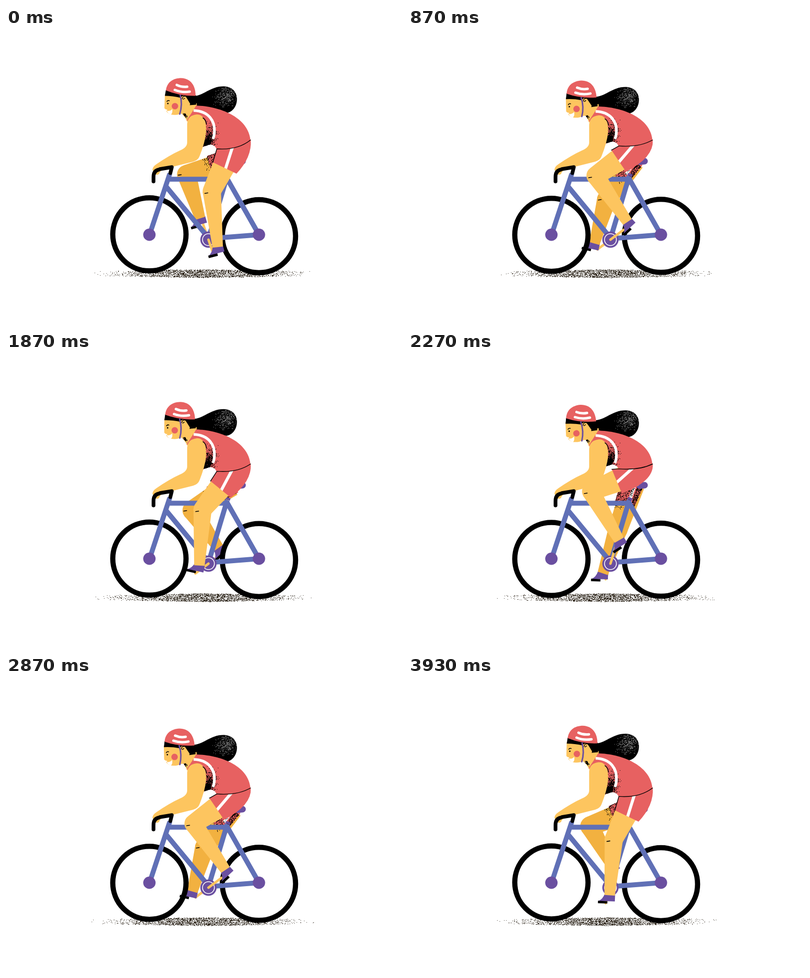
These frames come from a looping animation (800x600 px, 3.99 s). An HTML page with a canvas:

```html
<!DOCTYPE html>
<html lang="en">
<head>
<meta charset="utf-8">
<title>Cyclist</title>
<style>
html, body { margin: 0; width: 100%; height: 100%; overflow: hidden; background: #fff; }
canvas { display: block; }
</style>
</head>
<body>
<canvas id="stage" width="800" height="600"></canvas>
<script>
const ctx = document.getElementById('stage').getContext('2d');
const SKIN = '#fdc55f', FAR_SKIN = '#f2b140', RED = '#e76161', PURPLE = '#6a4fa0',
      BLUE = '#6070b6', BLACK = '#000', WHITE = '#fff';
const LOOP = 3990, STEPS_PER_MS = 0.015, STEPS_PER_TURN = 10;
const HUB = [409, 429], CRANK = 33, RAD = Math.PI / 180;

const NEAR = { hip: [456, 247], thigh: 93, shin: 114, foot: [8, -16], skin: SKIN,
               hipR: 26, kneeR: 18.5, mark: [-11, 4] };
const FAR = { hip: [455, 270], thigh: 94, shin: 93, foot: [-6, -12], skin: FAR_SKIN,
              hipR: 23, kneeR: 19.5, mark: [-14, 1] };

function random(seed) {
  let s = seed * 7919 + 17;
  return () => {
    s = (s + 0x6D2B79F5) | 0;
    let x = Math.imul(s ^ (s >>> 15), s | 1);
    x ^= x + Math.imul(x ^ (x >>> 7), x | 61);
    return ((x ^ (x >>> 14)) >>> 0) / 4294967296;
  };
}

function fill(path, color) {
  ctx.fillStyle = color;
  ctx.fill(new Path2D(path));
}

function line(path, color, width, cap = 'round') {
  ctx.strokeStyle = color;
  ctx.lineWidth = width;
  ctx.lineCap = cap;
  ctx.lineJoin = 'round';
  ctx.stroke(new Path2D(path));
}

function disc(x, y, r, color) {
  ctx.fillStyle = color;
  ctx.beginPath();
  ctx.arc(x, y, r, 0, 7);
  ctx.fill();
}

function ring(x, y, r, color, width) {
  ctx.strokeStyle = color;
  ctx.lineWidth = width;
  ctx.beginPath();
  ctx.arc(x, y, r, 0, 7);
  ctx.stroke();
}

function poly(points, color) {
  fill('M' + points.map(p => p.join(' ')).join('L') + 'Z', color);
}

// Grain: place(rand) gives one point, drawn only inside the clip path.
function grain(seed, count, color, place, clip) {
  const rand = random(seed);
  ctx.save();
  if (clip) ctx.clip(new Path2D(clip));
  ctx.fillStyle = color;
  for (let i = 0; i < count; i++) {
    const [x, y] = place(rand);
    ctx.fillRect(Math.round(x), Math.round(y), 1, 1);
  }
  ctx.restore();
}

const bell = rand => (rand() + rand() + rand() - 1.5) / 1.5;
const at = (p, d, n, along, side) =>
  [p[0] + d[0] * along + n[0] * side, p[1] + d[1] * along + n[1] * side];

function axes(a, b) {
  const dx = b[0] - a[0], dy = b[1] - a[1], len = Math.hypot(dx, dy);
  return { len, d: [dx / len, dy / len], n: [-dy / len, dx / len] };
}

function limb(a, b, ra, rb, color) {
  const { d, n } = axes(a, b);
  poly([at(a, d, n, 0, ra), at(b, d, n, 0, rb), at(b, d, n, 0, -rb), at(a, d, n, 0, -ra)], color);
}

// Two-bone leg standing on the pedal; angle 0 is straight down.
function pose(leg, angle) {
  const pedal = [HUB[0] + CRANK * Math.sin(angle), HUB[1] + CRANK * Math.cos(angle)];
  const ankle = [pedal[0] + leg.foot[0], pedal[1] + leg.foot[1]];
  const { len, d, n } = axes(leg.hip, ankle);
  const along = (leg.thigh ** 2 - leg.shin ** 2 + len ** 2) / (2 * len);
  const knee = at(leg.hip, d, n, along, Math.sqrt(Math.max(0, leg.thigh ** 2 - along ** 2)));
  return { pedal, ankle, knee, tilt: (15 + 29 * Math.sin(angle - 20 * RAD)) * RAD };
}

function drawCrank({ pedal }) {
  line(`M${HUB}L${pedal}`, SKIN, 5);
}

function drawLeg(leg, { ankle, knee, tilt }) {
  ctx.save();
  ctx.translate(...ankle);
  ctx.rotate(-tilt);
  fill('M-10-3L11-2L11 12L-2 12L-23 13Q-13 8-10-3Z', PURPLE);
  line('M-23 14.5H-4', BLACK, 5, 'butt');
  ctx.restore();
  limb(leg.hip, knee, leg.hipR, leg.kneeR, leg.skin);
  disc(...knee, leg.kneeR, leg.skin);
  limb(knee, ankle, leg.kneeR, 10.5, leg.skin);
  const x = knee[0] + leg.mark[0], y = knee[1] + leg.mark[1];
  line(`M${x - 3} ${y + .5}L${x + 3} ${y - .5}`, BLACK, 1.6);
}

function drawFarShorts({ knee }) {
  const { d, n } = axes(FAR.hip, knee);
  const p = (along, side) => at(FAR.hip, d, n, along, side);
  const shape = `M${p(-4, 26)}L${p(44, 24)}L${p(44, -16)}L${p(-4, -20)}Z`;
  fill(shape, RED);
  line(`M${p(0, -3)}L${p(30, -3)}`, WHITE, 6, 'butt');
  grain(5, 750, BLACK, r => p(50 * r() ** 1.3, 26 - 30 * r() ** 1.4), shape);
  grain(7, 500, BLACK, r => p(42 * r(), -8 - 12 * r()), shape);
  grain(6, 60, BLACK, r => p(43 + 12 * r() ** 2, 21 - 28 * r() ** 1.5));
}

function drawBike(sway) {
  ring(289.7, 419 - .7 * sway, 74, BLACK, 10.5);
  ring(511, 421.5 + .5 * sway, 74, BLACK, 10.5);
  line('M468 271L478 270', PURPLE, 13);
  line('M290 419L331 295M325 306.5H447M324 322L407 423M447 300L409 427M447 306L511 419M409 427L511 419',
    BLUE, 10, 'butt');
  line('M444 296L453 299', PURPLE, 5, 'butt');
  disc(289.7, 419, 12.5, PURPLE);
  disc(511, 419, 12.5, PURPLE);
  disc(...HUB, 16.5, PURPLE);
  ring(...HUB, 12, WHITE, 1.6);
}

function drawPonytail(lift) {
  const shape = 'M362 136C396 146 406 118 440 118C477 119 472 168 446 172C424 171 410 159 366 158Z';
  ctx.save();
  ctx.translate(0, lift);
  fill(shape, BLACK);
  grain(9, 430, '#8c8c8c', r => [446 + 32 * bell(r), 137 + 32 * bell(r)], shape);
  ctx.restore();
}

function drawTorso(drop, waist) {
  const shape = `M384 ${157 + drop}C430 ${158 + drop} 490 180 494 228Q468 ${waist + 3} 425 ${waist}` +
    `Q423 ${waist - 8} 412 ${waist - 9}L397 ${waist - 4}L397 195L365 ${187 + drop}L380 ${164 + drop}Z`;
  fill(`M348 ${162 + drop}L385 ${152 + drop}L386 ${162 + drop}L366 ${190 + drop}Q360 176 352 172Z`, SKIN);
  fill(shape, RED);
  grain(3, 1500, BLACK, r => {
    const out = r() ** 1.8;
    return [397 + 14 * r() + 22 * out * r(), waist - 3 - 14 * r() - 44 * out * r()];
  }, shape);
  ctx.save();
  ctx.clip(new Path2D(shape));
  line(`M379 ${167 + drop}C411 ${168 + drop} 422 ${190 + drop} 421 209Q421 218 418 225`, WHITE, 5.5, 'butt');
  ctx.restore();
  grain(4, 130, BLACK, r => {
    const a = r();
    return [355 + 9 * a + 4 * bell(r), 168 + drop + 11 * a + 4 * bell(r)];
  }, `M352 ${165 + drop}L368 ${165 + drop}L366 ${188 + drop}L358 176Z`);
}

function drawShorts({ knee }, waist) {
  const { d, n } = axes(NEAR.hip, knee);
  const hem = at([NEAR.hip[0] + 4, NEAR.hip[1]], d, n, 41, 0);
  const front = at(hem, d, n, 0, 27), back = at(hem, d, n, 0, -26);
  const edge = `M494 227Q468 ${waist + 3} 426 ${waist}`;
  const shape = `${edge}L${front}L${back}Q497 262 494.5 227Z`;
  fill(shape, RED);
  ctx.save();
  ctx.clip(new Path2D(shape));
  line(`M458 ${waist - 5}L${at(hem, d, n, 3, -2)}`, WHITE, 6, 'butt');
  ctx.restore();
  line(`${edge}L${front}`, BLACK, 1.4);
}

function drawArm(drop) {
  const y = v => v + drop;
  fill(`M385 ${y(175)}C400 ${y(174)} 406 ${y(192)} 404 213Q402 232 391 260Q388 268 378 271` +
    `L318 286Q311 290 309 296Q303 300 301 294L296 288Q296 281 304 276Q330 258 352 248` +
    `Q366 242 366 232L366 ${y(194)}Q367 ${y(177)} 385 ${y(175)}Z`, SKIN);
  line(`M398 ${y(182)}Q404 ${y(186)} 405 ${y(195)}`, BLACK, 1.6);
  line('M298 311V302Q298 289 309 287M311 286L335 282L332 294', BLACK, 7.5);
}

function drawHead(turn, drop) {
  ctx.save();
  ctx.translate(372, 172 + drop);
  ctx.rotate(-turn);
  ctx.translate(-372, -172);
  fill('M356 134L384 136L384 155L370 156Q358 152 356 134Z', BLACK);
  fill('M321 134L320 162Q322 165 326 165L324 168Q326 173 334 175Q346 177 352 173L368 172L372 153L362 136Z', SKIN);
  fill('M325 167Q331 169 336 164Q337 172 333 175Q326 173 325 167Z', WHITE);
  fill('M323 125L321 137Q336 137 353 141L366 141L382 136L350 128Z', BLACK);
  disc(359, 143, 6, SKIN);
  line('M356 143Q357 137 362 138M358 144L361 142', BLACK, 1.4);
  fill('M323 126C325 109 338 101 354 101C374 102 383 117 383 137Q352 138 323 126Z', RED);
  line('M345 115Q355 120 366 118.5M341 125Q355 131 371 128.5', WHITE, 5);
  line('M352 136Q357 155 351 174', PURPLE, 3);
  disc(341.3, 158, 6.5, RED);
  disc(327, 152.5, 1.5, BLACK);
  line('M325 148.5Q327 145.5 330 147', BLACK, 1.5);
  ctx.restore();
}

function drawShadow(step) {
  grain(100 + step, 2700, '#2c2419', r => {
    const x = bell(r), height = 17 * (1 - .5 * Math.abs(x));
    return [400 + 236 * x, 497.5 + height * (r() - .5)];
  });
}

function draw(step) {
  const phase = step % STEPS_PER_TURN;
  const wave = shift => Math.cos((phase - shift) * 2 * Math.PI / STEPS_PER_TURN);
  const sway = wave(0), drop = 2 - 2.4 * wave(8.6), waist = 240.5 + 4.5 * sway;
  const angle = (19 + 36 * phase) * RAD;
  const near = pose(NEAR, angle), far = pose(FAR, angle + Math.PI);

  ctx.fillStyle = WHITE;
  ctx.fillRect(0, 0, 800, 600);
  drawShadow(step);
  drawCrank(far);
  drawLeg(FAR, far);
  drawFarShorts(far);
  drawBike(sway);
  drawCrank(near);
  drawPonytail(2.2 * wave(2) - .4);
  drawLeg(NEAR, near);
  drawTorso(drop / 2, waist);
  drawShorts(near, waist);
  drawArm(drop / 2);
  drawHead(.045 * (1 - sway), drop);
}

const start = performance.now();
let shown = -1;
function tick() {
  const step = Math.floor(((performance.now() - start) % LOOP + 3.4) * STEPS_PER_MS);
  if (step !== shown) draw(shown = step);
  requestAnimationFrame(tick);
}
tick();
</script>
</body>
</html>
```
